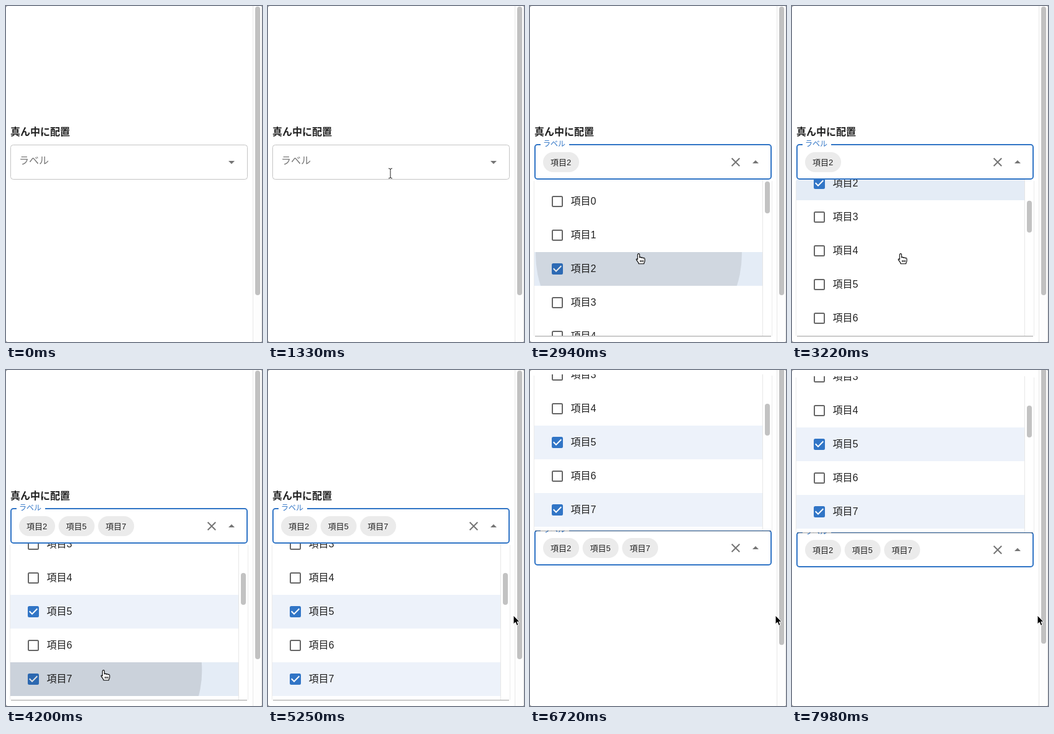
Recreate the animation shown at these times as an HTML page. Size 412 px wide and 538 px high, loop 8 s.

```html
<!DOCTYPE html>
<html lang="ja">
<head>
<meta charset="utf-8">
<title>Autocomplete</title>
<style>
html, body { margin: 0; width: 100%; height: 100%; overflow: hidden; background: #8a8a8a; }
#stage { display: block; width: 412px; height: 538px; }
text { font: 16px "Liberation Sans", "Noto Sans CJK JP", "Noto Sans CJK", sans-serif; fill: #212121; }
.heading { font-weight: bold; }
.chip text { font-size: 13px; }
.chip rect { fill: #ebebeb; }
.icon { fill: #757575; }
</style>
</head>
<body>
<svg id="stage" viewBox="0 0 412 538">
  <clipPath id="window"><rect width="412" height="538" rx="3"/></clipPath>
  <g clip-path="url(#window)">
    <rect width="412" height="538" fill="#fff"/>
    <g id="page">
      <text class="heading" x="7" y="206.5">真ん中に配置</text>
      <rect id="outline" fill="none" rx="4"/>
      <rect id="notch" x="17" y="220" height="4" fill="#fff"/>
      <text id="label">ラベル</text>
      <text id="placeholder" x="21" y="253" style="fill:#a6a6a6">プレースホルダー</text>
      <g id="chips"></g>
      <path id="clear" d="M324.7 243.7l12.6 12.6M337.3 243.7l-12.6 12.6" stroke="#757575" stroke-width="2"/>
      <path id="caret" class="icon"/>
    </g>
    <g id="popup">
      <path d="M6.5 280V528M389.5 280V528" stroke="#000" stroke-opacity=".08"/>
      <path d="M8 528.5H388" stroke="#000" stroke-opacity=".3"/>
      <path d="M8 529.5H388" stroke="#000" stroke-opacity=".1"/>
      <svg x="7" y="278" width="382" height="250" overflow="hidden">
        <rect width="382" height="250" rx="3" fill="#fff"/>
        <g id="list"></g>
        <rect x="367" width="15" height="250" fill="#fff"/>
        <path d="M367.5 0V250" stroke="#e6e6e6"/>
        <rect id="listThumb" x="371" width="8" height="51" rx="4" fill="#c2c2c2"/>
      </svg>
    </g>
    <rect x="397" width="15" height="538" fill="#fdfdfd"/>
    <path d="M397.5 0V538M411.5 0V538" stroke="#e8e8e8"/>
    <rect id="pageThumb" x="401" width="8" height="462" rx="4" fill="#c1c1c1"/>
    <g id="cursor">
      <path id="arrow" d="M0 0V14L3.2 11 5.5 16.3 8 15.2 5.8 10.2H10z" fill="#000" stroke="#fff"/>
      <g id="hand" fill="#fff" stroke="#000" stroke-width="1.1" stroke-linejoin="round">
        <path d="M-1.8 9V1.2a1.6 1.6 0 0 1 3.2 0V6c.2-1.2 2.8-1.2 3 .4.3-1.1 2.7-1 2.8.6.5-1 2.6-.7 2.6 1v3c0 2-1.4 2.6-1.4 4.8H0C0 13.5-2.2 12-3.6 9.6-4.6 8-2.8 7.2-1.8 9z"/>
        <path d="M2.6 10v3M4.8 10v3M7 10v3"/>
      </g>
      <path id="beam" d="M-3-8q3 0 3 2V6q0 2-3 2M3-8q-3 0-3 2M3 8q-3 0-3-2" fill="none" stroke="#222"/>
    </g>
  </g>
</svg>
<script>
const LOOP = 8000, STEP = 70, ROW = 54, BLUE = '#3175c6';
const FOCUS = 1540, OPEN = 1610, FLIP_AT = 10;
const $ = id => document.getElementById(id);

function make(tag, attrs, parent, text) {
  const el = document.createElementNS('http://www.w3.org/2000/svg', tag);
  set(el, attrs);
  if (text) el.textContent = text;
  return parent.appendChild(el);
}
function set(el, attrs) {
  for (const k in attrs) el.setAttribute(k, attrs[k]);
}
function show(el, on) {
  el.style.display = on ? '' : 'none';
}

// Piecewise linear value through [time, value] points
function track(points, t) {
  if (t <= points[0][0]) return points[0][1];
  for (let i = 1; i < points.length; i++) {
    const [t0, a] = points[i - 1], [t1, b] = points[i];
    if (t <= t1) return a + (b - a) * (t - t0) / (t1 - t0);
  }
  return points[points.length - 1][1];
}

// cubic-bezier with control heights 0 and 1
function ease(p, x1, x2) {
  if (p <= 0) return 0;
  if (p >= 1) return 1;
  let lo = 0, hi = 1;
  for (let i = 0; i < 20; i++) {
    const u = (lo + hi) / 2, v = 1 - u;
    if (3 * u * v * v * x1 + 3 * u * u * v * x2 + u * u * u < p) lo = u; else hi = u;
  }
  return lo * lo * (3 - 2 * lo);
}

const clicks = {
  2: { at: 2650, x: 168, y: 3 },
  5: { at: 3490, x: 168, y: 37 },
  7: { at: 3948, x: 150, y: 13 }
};
const cursorX = [[630, 211], [840, 203], [1050, 172], [1190, 163], [1260, 163], [1330, 197],
  [1750, 197], [2030, 184], [2310, 179], [2590, 175], [3640, 175], [3850, 157], [4340, 157],
  [4620, 220], [4970, 352], [5110, 384], [5180, 386], [5250, 395]];
const cursorY = [[630, 504], [840, 405], [1050, 275], [1190, 244], [1260, 244], [1330, 268],
  [1750, 268], [2030, 298], [2310, 308], [2590, 397], [3640, 397], [3850, 481], [4340, 481],
  [4620, 436], [4970, 380], [5110, 388], [5180, 389], [5250, 393]];
const listScroll = [[2940, 0], [3010, 12], [3080, 45], [3150, 92], [3220, 137], [3290, 173], [3360, 196]];
const pull = [[5950, 0], [6020, 4], [6160, 12], [6300, 21], [6370, 24], [6510, 29], [6720, 35],
  [7350, 35], [7420, 36], [7490, 37], [7910, 37], [7980, 38]];

const rows = Array.from({ length: 10 }, (_, i) => {
  const el = make('svg', { y: 8 + i * ROW, width: 367, height: ROW, overflow: 'hidden' }, $('list'));
  const bg = make('rect', { width: 367, height: ROW }, el);
  const box = make('rect', { x: 29, y: 19, width: 16, height: 16, rx: 1.5, 'stroke-width': 2 }, el);
  const tick = make('path', { d: 'M10 17l-5-5 1.41-1.41L10 14.17l7.59-7.59L19 8l-9 9z',
    transform: 'translate(25 15)', fill: '#fff' }, el);
  make('text', { x: 58.5, y: 32 }, el, '項目' + i);
  const ripple = make('circle', { fill: '#000' }, el);
  return { bg, box, tick, ripple, click: clicks[i] };
});

const chips = [2, 5, 7].map((n, i) => {
  const el = make('g', { class: 'chip', transform: `translate(${21 + i * 63.6} 234)` }, $('chips'));
  make('rect', { width: 58, height: 32, rx: 16 }, el);
  make('text', { x: 12, y: 20.5 }, el, '項目' + n);
  return { el, n };
});

const isChecked = (click, t) => !!click && t >= click.at + 70;

function drawField(t) {
  const focused = t >= FOCUS, open = t >= OPEN;
  const p = ease((t - FOCUS + STEP) / 220, 0, .2);
  set($('outline'), focused
    ? { x: 8, y: 222, width: 380, height: 55, stroke: BLUE, 'stroke-width': 2 }
    : { x: 7.5, y: 222.5, width: 381, height: 55, stroke: '#c4c4c4', 'stroke-width': 1 });
  set($('notch'), { width: focused ? 46 * Math.min(1, p * 1.5) : 0 });
  const lift = focused ? p : 0;
  set($('label'), { transform: `translate(21 ${253 - 28.5 * lift}) scale(${1 - lift / 4})` });
  $('label').style.fill = focused ? BLUE : '#757575';
  const filled = isChecked(clicks[2], t);
  set($('placeholder'), { opacity: focused && !filled ? p : 0 });
  show($('clear'), filled);
  set($('caret'), { d: open ? 'M358 252h10l-5-5z' : 'M358 248h10l-5 5z' });
  chips.forEach(c => show(c.el, isChecked(clicks[c.n], t)));
}

function drawRow(row, t, hover) {
  const checked = isChecked(row.click, t);
  const fill = checked ? (hover ? '#e4ecf6' : '#edf2fa') : (hover ? '#f2f3f3' : '#fff');
  set(row.bg, { fill });
  set(row.box, { fill: checked ? BLUE : 'none', stroke: checked ? BLUE : '#666' });
  show(row.tick, checked);
  if (!row.click) return;
  const { at, x, y } = row.click, age = t - at;
  const full = Math.hypot(Math.max(x, 367 - x), Math.max(y, ROW - y));
  set(row.ripple, {
    cx: x, cy: y, r: full * ease(age / 550, .4, .2),
    opacity: track([[0, .1], [100, .2], [252, .11], [460, 0]], age)
  });
}

function draw(t) {
  const x = track(cursorX, t), y = track(cursorY, t);
  const scroll = track(listScroll, t), shift = track(pull, t);
  const open = t >= OPEN;
  const overList = open && x < 374 && y >= 286;
  let hover = overList ? Math.floor((y - 286 + scroll) / ROW) : -1;
  if (t >= 2940 && t < 3430) hover = 2;

  drawField(t);
  rows.forEach((row, i) => drawRow(row, t, i === hover));
  set($('page'), { transform: `translate(0 ${shift})` });
  set($('popup'), { transform: `translate(0 ${shift - (shift > FLIP_AT ? 306 : 0)})` });
  show($('popup'), open);
  set($('list'), { transform: `translate(0 ${-scroll})` });
  set($('listThumb'), { y: 3 + scroll * .225 });
  set($('pageThumb'), { y: 1 - shift * .65 });

  const inField = x < 389 && y > 222 && y < 278;
  set($('cursor'), { transform: `translate(${x} ${y})` });
  show($('cursor'), t >= 630);
  show($('hand'), overList);
  show($('beam'), inField);
  show($('arrow'), !overList && !inField);
}

const start = performance.now();
function frame() {
  const t = (performance.now() - start) % LOOP;
  draw(Math.floor(t / STEP) * STEP);
  requestAnimationFrame(frame);
}
frame();
</script>
</body>
</html>
```
